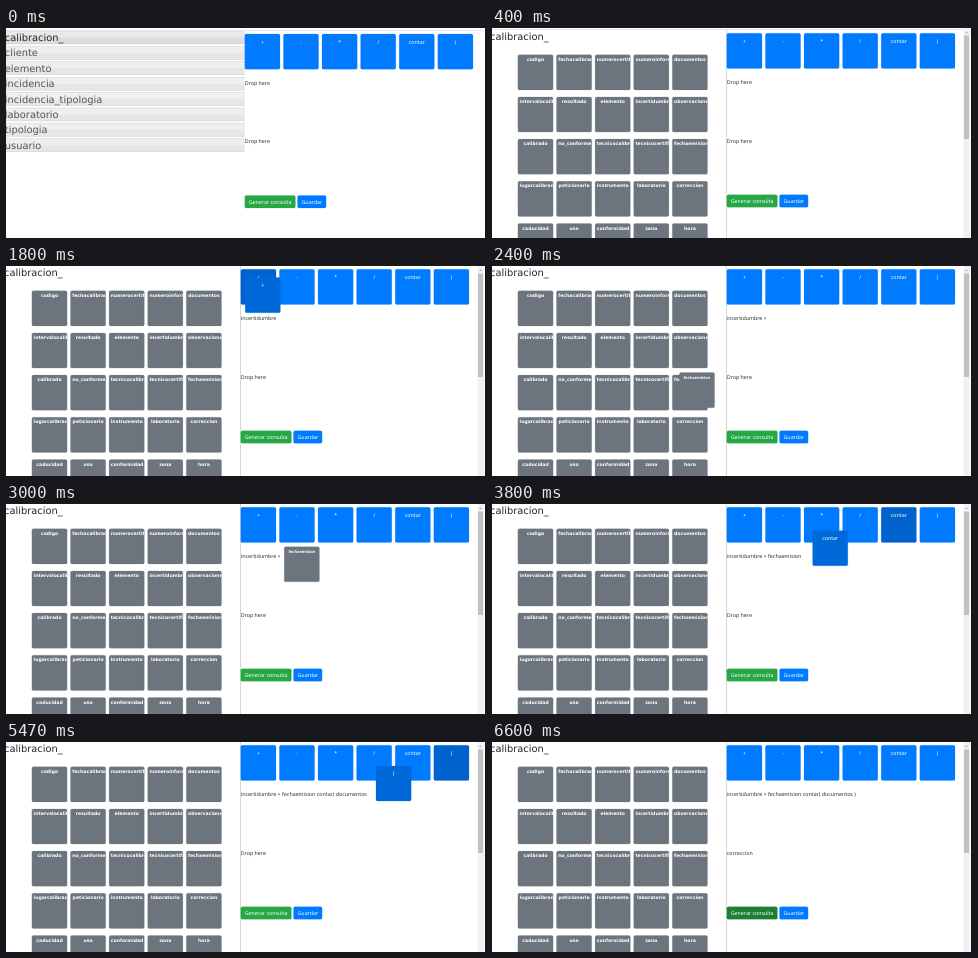
These frames come from a looping animation (480x210 px, 6790 ms). An HTML page with a canvas:

```html
<!DOCTYPE html>
<html lang="es">
<head>
<meta charset="utf-8">
<title>Generador de consultas</title>
<style>
html, body { margin: 0; width: 100%; height: 100%; overflow: hidden; background: #fff; }
canvas { display: block; width: 480px; height: 210px; }
</style>
</head>
<body>
<canvas id="stage" width="480" height="210"></canvas>
<script>
const ctx = document.getElementById('stage').getContext('2d');
const LOOP = 6790;
const SANS = '"Noto Sans", "Open Sans", sans-serif';
const WIDE = '"DejaVu Sans", sans-serif';
const BODY = '5.3px ' + SANS;
const SIZE = 35.2, GAP_X = 38.6, GAP_Y = 42.2, ROW = 15.4;
const PANEL = 268, SPLIT = 234.8, SCROLLED = -2.7;
const GREY = '#6c757d', BLUE = '#007bff', INK = '#2b3035';

const TABLES = ['calibracion_', 'cliente', 'elemento', 'incidencia',
  'incidencia_tipologia', 'laboratorio', 'tipologia', 'usuario'];
const FIELDS = [
  'codigo', 'fechacalibracion', 'numerocertificado', 'numeroinforme', 'documentos',
  'intervalocalibracion', 'resultado', 'elemento', 'incertidumbre', 'observaciones',
  'calibrado', 'no_conforme', 'tecnicocalibracion', 'tecnicocertificado', 'fechaemision',
  'lugarcalibracion', 'peticionario', 'instrumento', 'laboratorio', 'correccion',
  'caducidad', 'uso', 'conformidad', 'zona', 'hora'];
const OPS = ['+', '-', '*', '/', 'contar', ')'];

const clamp = v => Math.max(0, Math.min(1, v));
const swing = v => 0.5 - Math.cos(clamp(v) * Math.PI) / 2;
const fieldSpot = (i, top) =>
  [25.9 + GAP_X * (i % 5), top + 27.4 + GAP_Y * Math.floor(i / 5)];
const opSpot = (i, x, top) => [x + GAP_X * i, top + 6];

// A piece is picked up at start, reaches its goal at end and is dropped soon after
function drag(label, start, end, goal, bow = 0) {
  const op = OPS.indexOf(label);
  const from = op < 0 ? fieldSpot(FIELDS.indexOf(label), SCROLLED) : opSpot(op, SPLIT, SCROLLED);
  return { label, op, from, goal, bow, start, end, drop: end + 60 };
}

const FORMULA = [
  drag('incertidumbre', 800, 1400, [236, 47], 24),
  drag('+', 1670, 2030, [250, 32]),
  drag('fechaemision', 2270, 3020, [278.4, 42.5], 10),
  drag('contar', 3560, 3895, [305, 32]),
  drag('documentos', 4022, 4800, [298, 45]),
  drag(')', 5200, 5603, [350, 31])
];
const RESULT = drag('correccion', 5860, 6200, [245.7, 103]);
const DRAGS = [...FORMULA, RESULT];

// 15 pictures per second, five in the calm stretches
function tick(t) {
  const calm = (t >= 2400 && t < 3600) || (t >= 4200 && t < 4600) || t >= 6200;
  const step = calm ? 200 : 200 / 3;
  return Math.floor((t + 4) / step) * step;
}

function rect(x, y, w, h, color) {
  ctx.fillStyle = color;
  ctx.fillRect(x, y, w, h);
}

// Rounded box with a soft rim
function box(x, y, w, h, color) {
  ctx.fillStyle = ctx.strokeStyle = color;
  ctx.beginPath();
  ctx.roundRect(x, y, w, h, 1.5);
  ctx.fill();
  ctx.globalAlpha = 0.2;
  ctx.lineWidth = 1;
  ctx.stroke();
  ctx.globalAlpha = 1;
}

function text(s, x, y, font, color, align = 'left') {
  ctx.font = font;
  ctx.fillStyle = color;
  ctx.textAlign = align;
  ctx.fillText(s, x, y);
}

function clipped(x, y, w, h, paint) {
  ctx.save();
  ctx.beginPath();
  ctx.rect(x, y, w, h);
  ctx.clip();
  paint();
  ctx.restore();
}

function tile(label, x, y) {
  box(x, y, SIZE, SIZE, GREY);
  clipped(x, y, SIZE, SIZE, () => {
    const font = 'bold 4.6px ' + WIDE;
    ctx.font = font;
    const left = Math.max(1.7, (SIZE - ctx.measureText(label).width) / 2);
    text(label, x + left, y + 6.1, font, '#fff');
  });
}

function button(label, x, y, w, h, baseline, color) {
  box(x, y, w, h, color);
  text(label, x + w / 2, y + baseline, BODY, '#fff', 'center');
}

function header(i, y, w, active) {
  const hot = i === 0;
  if (!active) {
    const h = 13.4, light = hot ? '#e9e9e9' : '#efefef', dark = hot ? '#dcdcdc' : '#e6e6e6';
    rect(0, y, w, h, dark);
    rect(0, y, w, h / 2, light);
    rect(0, y, w, 0.5, '#d3d3d3');
    rect(0, y + h - 0.5, w, 0.5, '#d3d3d3');
  }
  text(TABLES[i], active ? -2 : -1.2, y + 10.2, '9.85px ' + WIDE, hot ? '#212529' : '#555');
}

function accordion(t, top, w) {
  const open = PANEL * swing((t - 60) / 420);
  const y = top + 2.8;
  header(0, y, w, open > 0);
  if (open > 0) {
    clipped(0, y + 13.4, w, open, () =>
      FIELDS.forEach((f, i) => tile(f, ...fieldSpot(i, top))));
    rect(w - 0.6, y - 1, 0.8, open + 14, '#ccc');
  }
  for (let i = 1; i < TABLES.length; i++) header(i, y + ROW * i + open, w, false);
}

function scrollbar() {
  rect(471.5, 0, 6.5, 210, '#f1f1f1');
  rect(472, 7.5, 5, 103.5, '#c1c1c1');
  ctx.fillStyle = '#aaa';
  ctx.beginPath();
  ctx.moveTo(473, 5);
  ctx.lineTo(474.5, 3.5);
  ctx.lineTo(476, 5);
  ctx.fill();
}

function builder(t, x, top) {
  OPS.forEach((s, i) => {
    const hot = DRAGS.some(d => d.op === i && t >= d.start - 165 && t < d.drop);
    button(s, ...opSpot(i, x, top), SIZE, SIZE, 9.6, hot ? '#0062cc' : BLUE);
  });
  const words = FORMULA.filter(d => t >= d.drop)
    .map(d => d.label === 'contar' ? 'contar(' : d.label);
  text(words.join(' ') || 'Drop here', x, top + 56.8, BODY, INK);
  text(t >= RESULT.drop ? RESULT.label : 'Drop here', x, top + 115.2, BODY, INK);
  const y = top + 167.4;
  button('Generar consulta', x, y, 50.6, 12.6, 8.3, t >= 6590 ? '#1e7e34' : '#28a745');
  button('Guardar', x + 52.7, y, 28.6, 12.6, 8.3, BLUE);
}

function ghost(t) {
  const d = DRAGS.find(g => t >= g.start && t < g.drop);
  if (!d) return;
  const k = swing((t - d.start) / (d.end - d.start));
  const [x, y] = d.from.map((a, i) => a + (d.goal[i] - a) * k);
  const dip = y + d.bow * Math.sin(k * Math.PI);
  if (d.op >= 0) return button(d.label, x, dip, SIZE, SIZE, 9.6, '#0069d9');
  box(x, dip, SIZE, SIZE, GREY);
  text(d.label, x + SIZE / 2, dip + 6.4, 'bold 4px ' + SANS, '#fff', 'center');
}

function draw(t) {
  const overflow = t >= 190;
  const x = overflow ? SPLIT : SPLIT + 4;
  const top = overflow ? -0.7 + (SCROLLED + 0.7) * clamp((t - 1060) / 140) : 0;
  rect(0, 0, 480, 210, '#fff');
  rect(0, top + 2, 478, 0.7, '#ddd');
  accordion(t, top, x - 0.2);
  builder(t, x, top);
  if (overflow) scrollbar();
  ghost(t);
  rect(479, 0, 1, 210, '#111');
}

const start = performance.now();
function frame() {
  ctx.textRendering = 'geometricPrecision';
  draw(tick((performance.now() - start) % LOOP));
  requestAnimationFrame(frame);
}
frame();
</script>
</body>
</html>
```
